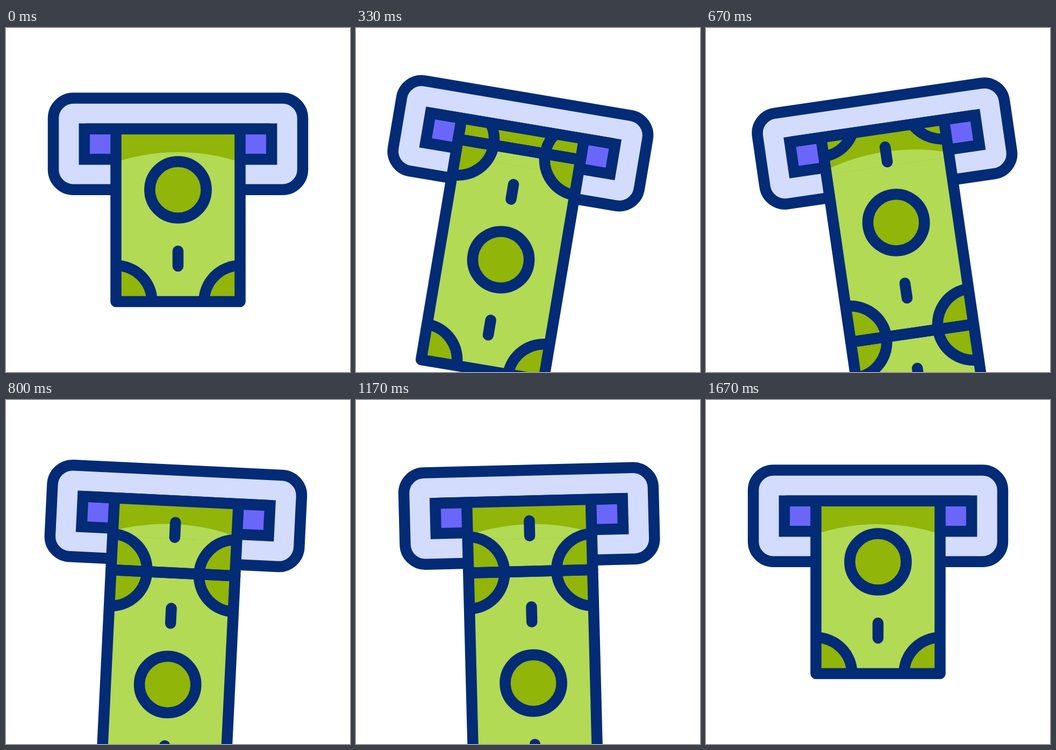
Recreate the animation shown at these times as an HTML page with a canvas. Size 640x640 px, loop 2 s.

```html
<!DOCTYPE html>
<html lang="en">
<head>
<meta charset="utf-8">
<title>Cash dispenser</title>
<style>
html, body { margin: 0; width: 100%; height: 100%; overflow: hidden; background: #fff; }
canvas { display: block; width: 100vmin; height: 100vmin; }
</style>
</head>
<body>
<canvas id="stage" width="640" height="640"></canvas>
<script>
const ctx = document.getElementById('stage').getContext('2d');
const NAVY = '#032b76', PALE = '#d3dcfd', VIOLET = '#6b66fa';
const GREEN = '#b2da54', OLIVE = '#91b508';
const LOOP = 2000, FPS = 30, LAST = 50;
const CX = 320, HINGE = 130.5, SLOT = 188;
const BILL = 416, HALF = 115.5, REST = 509, COUNT = 4;
const TRAVEL = BILL * (COUNT - 1), TRAVEL_END = 47;

// Swing keys: [frame, degrees]
const SWING = [[0, 0], [9, 10], [19, -9], [26, 5.5], [32.6, -2], [39.5, 0]];

const clamp = u => Math.min(1, Math.max(0, u));
const sine = u => (1 - Math.cos(Math.PI * clamp(u))) / 2;
const rad = deg => deg * Math.PI / 180;

function swingAt(n) {
  for (let i = 1; i < SWING.length; i++) {
    const [a, from] = SWING[i - 1], [b, to] = SWING[i];
    if (n <= b) return from + (to - from) * sine((n - a) / (b - a));
  }
  return 0;
}

function shape(build, fill, stroke) {
  ctx.beginPath();
  build();
  if (fill) { ctx.fillStyle = fill; ctx.fill(); }
  if (stroke) { ctx.strokeStyle = stroke; ctx.stroke(); }
}

const frame = () => ctx.rect(-HALF, -BILL, HALF * 2, BILL);
const disc = () => ctx.arc(0, -BILL / 2, 52.6, 0, Math.PI * 2);

// Quarter circles in the four corners of a bill
function corners() {
  for (let i = 0; i < 4; i++) {
    const x = i % 2 ? HALF : -HALF, y = i < 2 ? 0 : -BILL;
    ctx.moveTo(x + 67, y);
    ctx.arc(x, y, 67, 0, Math.PI * 2);
  }
}

function dashes() {
  for (const y of [-80, 80 - BILL]) {
    ctx.moveTo(0, y - 14);
    ctx.lineTo(0, y + 14);
  }
}

function clipped(build, fill, stroke) {
  ctx.save();
  ctx.beginPath();
  frame();
  ctx.clip();
  shape(build, fill, stroke);
  ctx.restore();
}

function billFill() {
  shape(frame, GREEN);
  clipped(corners, OLIVE);
  shape(disc, OLIVE);
}

function billLines() {
  clipped(corners, null, NAVY);
  shape(disc, null, NAVY);
  shape(dashes, null, NAVY);
  shape(frame, null, NAVY);
}

// The newest bill stays in the slot; the strip below it tears off and drops
function eachBill(seam, drop, paint) {
  for (let k = COUNT - 1; k >= 0; k--) {
    ctx.save();
    ctx.translate(CX, seam);
    if (k > 0) {
      ctx.translate(5 * drop, 128 * drop);
      ctx.rotate(rad(-15 * drop));
      ctx.translate(0, BILL * k);
    }
    paint();
    ctx.restore();
  }
}

function shadow() {
  ctx.save();
  ctx.beginPath();
  ctx.rect(CX - HALF, SLOT, HALF * 2, 70);
  ctx.clip();
  shape(() => {
    ctx.rect(CX - HALF, SLOT, HALF * 2, 70);
    ctx.arc(CX, 606, 375, 0, Math.PI * 2);
  });
  ctx.fillStyle = OLIVE;
  ctx.fill('evenodd');
  ctx.restore();
}

function draw(n) {
  const seam = REST - TRAVEL + TRAVEL * sine(n / TRAVEL_END);
  const drop = Math.pow(Math.max(0, n - 40.2) / 7.8, 2);

  ctx.fillStyle = '#fff';
  ctx.fillRect(0, 0, 640, 640);
  ctx.lineWidth = 20.5;
  ctx.lineCap = ctx.lineJoin = 'round';

  ctx.save();
  ctx.translate(CX, HINGE);
  ctx.rotate(rad(swingAt(n)));
  ctx.translate(-CX, -HINGE);

  shape(() => ctx.roundRect(88, 130.6, 464, 170.2, 37.5), PALE, NAVY);
  ctx.lineJoin = 'miter';
  shape(() => ctx.rect(145.8, 187.8, 348.4, 56.4), VIOLET, NAVY);
  ctx.lineJoin = 'round';

  ctx.save();
  ctx.beginPath();
  ctx.rect(-400, SLOT, 1440, 1400);
  ctx.clip();
  eachBill(seam, drop, billFill);
  shadow();
  eachBill(seam, drop, billLines);
  ctx.restore();

  shape(() => { ctx.moveTo(150, 187.8); ctx.lineTo(490, 187.8); }, null, NAVY);
  ctx.restore();
}

const start = performance.now();
function tick() {
  const t = Math.max(0, performance.now() - start) % LOOP;
  draw(Math.min(LAST, Math.floor((t + 4) * FPS / 1000)));
  requestAnimationFrame(tick);
}
tick();
</script>
</body>
</html>
```
